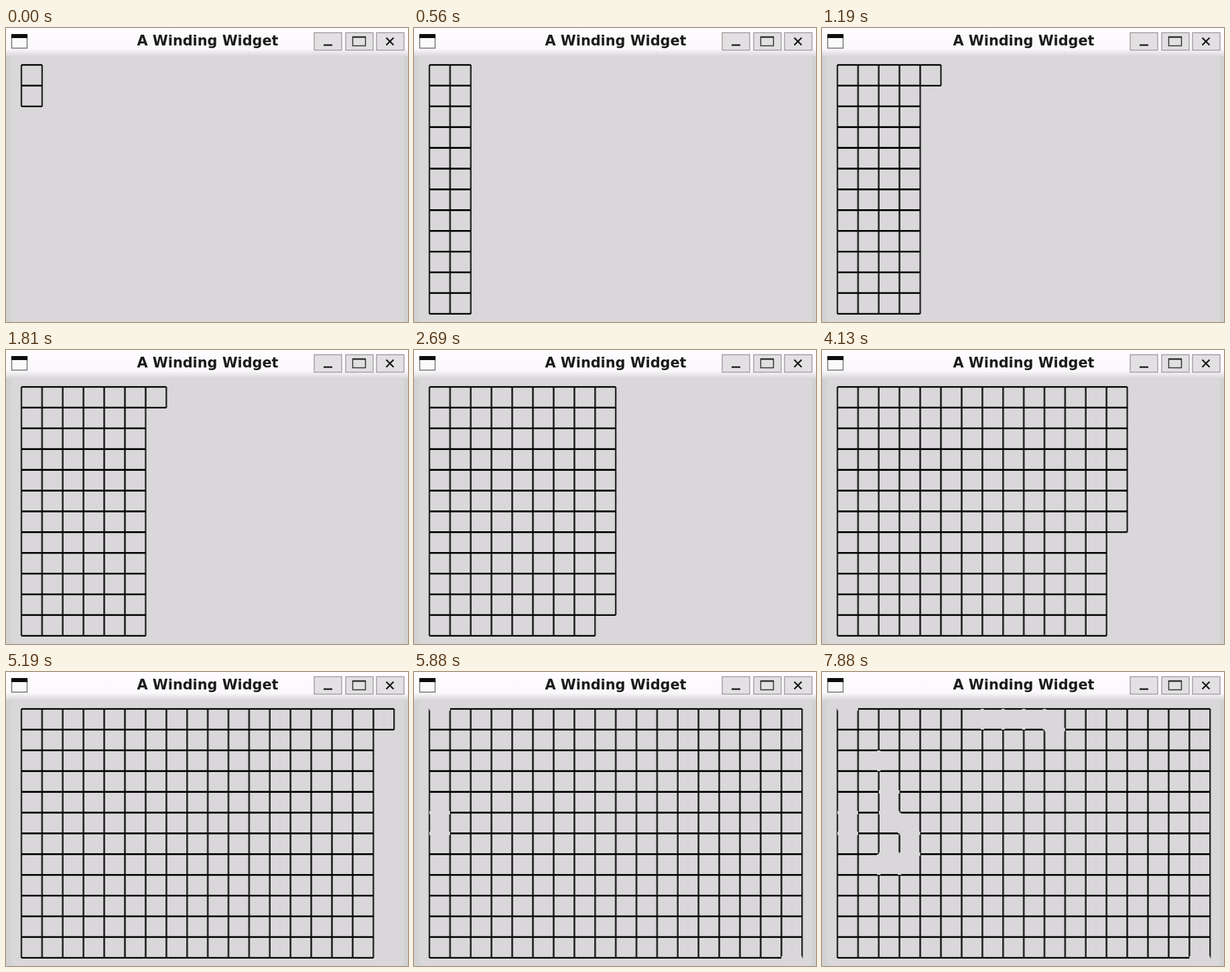
An HTML page with a canvas for the animation above (8 s loop, 600 by 438 pixels).

```html
<!DOCTYPE html>
<html lang="en">
<head>
<meta charset="utf-8">
<title>Maze</title>
<style>
html, body { margin: 0; width: 100%; height: 100%; overflow: hidden; background: #d9d7d9; }
canvas { display: block; filter: blur(0.6px); }
</style>
</head>
<body>
<canvas width="600" height="438"></canvas>
<script>
const ctx = document.querySelector('canvas').getContext('2d');
const BG = '#d9d7d9', LOOP = 8000, TICK = 62.5;
const COLS = 18, ROWS = 12, SIZE = 30.9;
const X = c => 23 + c * SIZE, Y = r => 55 + r * SIZE;

// Openings: [tick, side, column, row]; 'h' is a cell's top wall, 'v' its left wall
const openings = [
  [88, 'h', 0, 0], [89, 'h', 17, 12],
  [94, 'h', 0, 5], [94, 'h', 0, 6],
  [117, 'v', 7, 0], [117, 'v', 8, 0], [117, 'v', 9, 0], [117, 'v', 10, 0], [117, 'h', 10, 1],
  [125, 'v', 2, 2], [125, 'h', 2, 7], [125, 'v', 2, 7], [125, 'v', 3, 7],
  [126, 'h', 3, 7], [126, 'h', 3, 6], [126, 'v', 3, 5], [126, 'h', 2, 5], [126, 'h', 2, 4]
];

function line(x1, y1, x2, y2, color, width) {
  ctx.strokeStyle = color;
  ctx.lineWidth = width;
  ctx.beginPath();
  ctx.moveTo(x1, y1);
  ctx.lineTo(x2, y2);
  ctx.stroke();
}

const wallH = (c, r, color, width) => line(X(c), Y(r), X(c + 1), Y(r), color, width);
const wallV = (c, r, color, width) => line(X(c), Y(r), X(c), Y(r + 1), color, width);

function box(x, y, w, h, fill, stroke) {
  ctx.fillStyle = fill;
  ctx.fillRect(x, y, w, h);
  ctx.strokeStyle = stroke;
  ctx.lineWidth = 1.5;
  ctx.strokeRect(x, y, w, h);
}

function drawWindow() {
  ctx.fillStyle = BG;
  ctx.fillRect(0, 0, 600, 438);
  ctx.fillStyle = '#d3d2d3';
  ctx.fillRect(0, 40, 8, 398);
  ctx.fillRect(594, 40, 6, 398);

  const fade = ctx.createLinearGradient(0, 0, 0, 42);
  fade.addColorStop(0, '#fefcff');
  fade.addColorStop(0.74, '#faf8fb');
  fade.addColorStop(1, BG);
  ctx.fillStyle = fade;
  ctx.fillRect(0, 0, 600, 42);

  box(8.5, 10, 23, 20, '#fafafa', '#777');
  ctx.fillStyle = '#0c0c0c';
  ctx.fillRect(8, 9, 24, 6);

  ctx.fillStyle = '#1c1c1c';
  ctx.font = 'bold 20.8px "DejaVu Sans", sans-serif';
  ctx.textAlign = 'center';
  ctx.fillText('A Winding Widget', 301, 26);

  for (const x of [460, 507, 553]) box(x, 7, 41, 26, '#e2e0e2', '#a5a3a5');
  line(474, 25.5, 487, 25.5, '#111', 2.2);
  ctx.strokeStyle = '#333';
  ctx.lineWidth = 1.5;
  ctx.strokeRect(517.5, 13.5, 19, 13);
  line(517, 13.5, 537, 13.5, '#222', 2);
  line(567.5, 14.5, 578.5, 25.5, '#1a1a1a', 2.3);
  line(578.5, 14.5, 567.5, 25.5, '#1a1a1a', 2.3);
}

function drawGrid(count) {
  for (let i = 0; i < count; i++) {
    const c = Math.floor(i / ROWS), r = i % ROWS;
    wallV(c, r, '#2a2a2a', 2.4);
    wallV(c + 1, r, '#2a2a2a', 2.4);
  }
  for (let i = 0; i < count; i++) {
    const c = Math.floor(i / ROWS), r = i % ROWS;
    wallH(c, r, '#000', 2.3);
    wallH(c, r + 1, '#000', 2.3);
  }
}

function frame(now) {
  const tick = Math.floor((now % LOOP + 4.9) / TICK);
  drawWindow();
  drawGrid(Math.min(COLS * ROWS, Math.floor(2.7 + 2.44 * tick)));
  for (const [at, side, c, r] of openings) {
    if (tick >= at) (side === 'h' ? wallH : wallV)(c, r, BG, 5);
  }
  requestAnimationFrame(frame);
}
frame(0);
</script>
</body>
</html>
```
